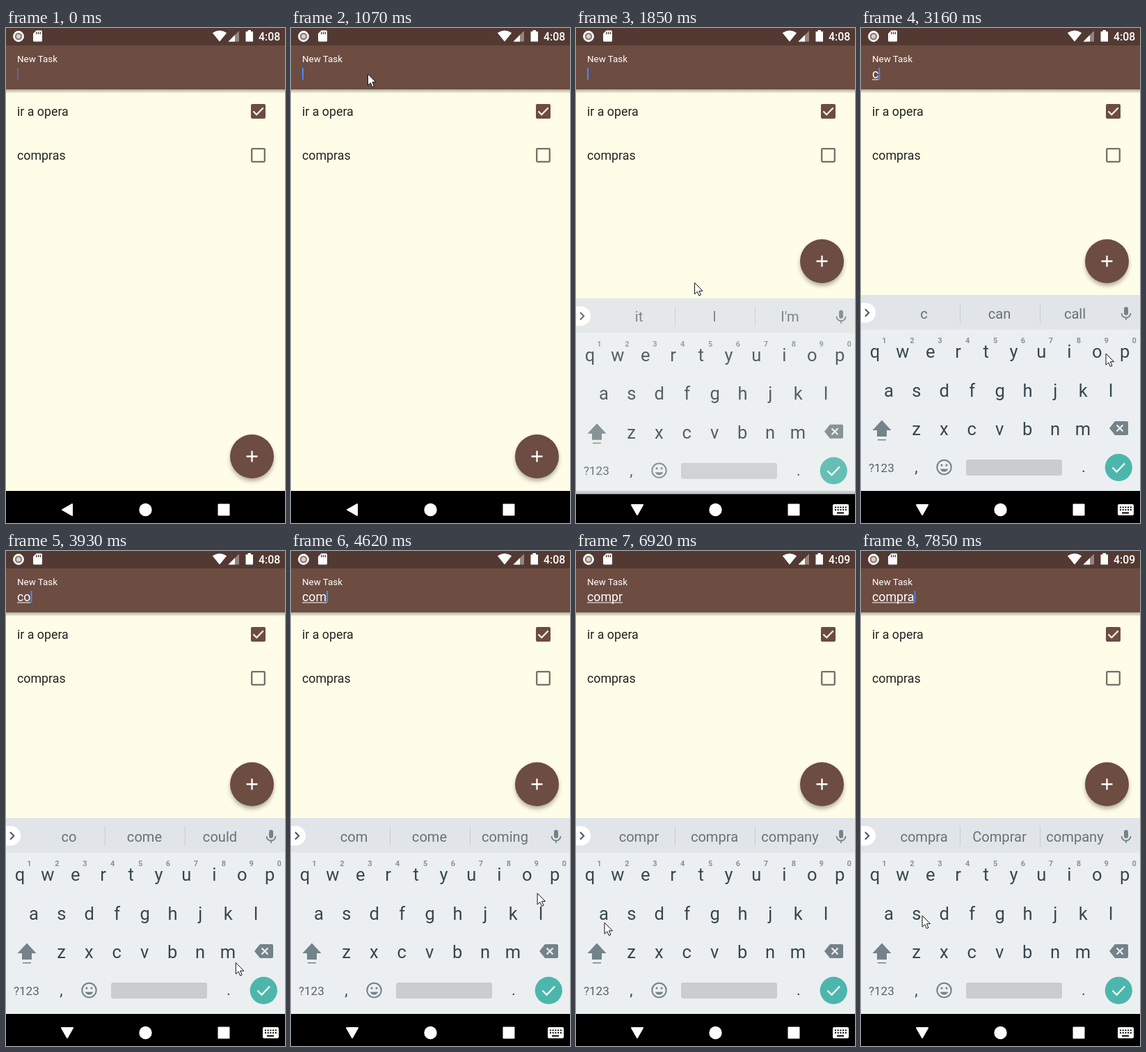
These frames come from a looping animation (401 px wide and 710 px high, 8000 ms). An HTML page:

```html
<!DOCTYPE html>
<html lang="en">
<head>
<meta charset="utf-8">
<title>New Task</title>
<style>
html, body { margin: 0; width: 100%; height: 100%; overflow: hidden; background: #000; }
svg { display: block; width: 100%; height: 100%; font-family: Roboto, sans-serif; }
</style>
</head>
<body>
<svg id="stage" viewBox="0 0 401 710" xmlns="http://www.w3.org/2000/svg"></svg>
<script>
const LOOP = 8000;
const stage = document.getElementById('stage');

const text = (x, y, size, fill, str, extra = '') =>
  `<text x="${x}" y="${y}" font-size="${size}" fill="${fill}" ${extra}>${str}</text>`;
const mid = (x, y, size, fill, str, extra = '') =>
  text(x, y, size, fill, str, 'text-anchor="middle" ' + extra);
const rect = (x, y, w, h, fill, extra = '') =>
  `<rect x="${x}" y="${y}" width="${w}" height="${h}" fill="${fill}" ${extra}/>`;
const circle = (x, y, r, fill, extra = '') =>
  `<circle cx="${x}" cy="${y}" r="${r}" fill="${fill}" ${extra}/>`;
const path = (d, fill, extra = '') => `<path d="${d}" fill="${fill}" ${extra}/>`;
const line = (d, color, w, extra = '') =>
  path(d, 'none', `stroke="${color}" stroke-width="${w}" ${extra}`);

// Keyboard layout: letters, first key centre, row centre
const rows = [['qwertyuiop', 20, 464], ['asdfghjkl', 40, 519.5], ['zxcvbnm', 79.5, 575]];
const keyPos = {};
rows.forEach(([letters, x0, y]) =>
  [...letters].forEach((ch, i) => keyPos[ch] = { x: x0 + i * 39.9, y }));

const INK = '#37474f', ICON = '#74828a';

function statusBar() {
  return rect(0, 0, 401, 25, '#523a33') +
    circle(18, 12, 6.6, '#8d7c77', 'stroke="#fff" stroke-width="2.6"') +
    circle(18, 12, 3, '#d9d2d0') +
    path('M43.5 3.5H50.5Q52 3.5 52 5V18Q52 19.5 50.5 19.5H40.500Q39 19.500 39 18V8Z', '#fff') +
    line('M43.700 5.500V9M46.500 5.500V9M49.300 5.500V9', '#523a33', 1.3) +
    path('M296.800 7Q307 0 317.200 7L307 19.500Z', '#fff') +
    path('M335 4V19.500H319.500Z', '#94847f') +
    path('M329 10V19.500H319.500Z', '#fff') +
    path('M347.500 3H352V5H355V19.500H344.500V5H347.500Z', '#fff') +
    text(363, 18, 15.8, '#fff', '4:08', 'id="clock" font-weight="500"');
}

function listRow(y, label, done) {
  const box = done
    ? rect(352, y - 10.500, 21, 21, '#6d4c41', 'rx="2"') +
      line(`M355.500 ${y}l4.700 4.700 9.500-9.700`, '#fffde7', 2.2)
    : rect(353.200, y - 9.300, 18.600, 18.600, 'none', 'rx="1" stroke="#757069" stroke-width="2.3"');
  return text(16, y + 6, 17.8, '#22221f', label) + box;
}

function keyboard() {
  let s = rect(0, 383, 401, 281, '#ebeff2') + rect(0, 664, 401, 60, '#000') +
    rect(0, 383, 401, 49.500, '#e1e5e9') +
    rect(-20, 394.500, 41, 28, '#fff', 'rx="14"') +
    line('M6 403.300l5.200 5.200-5.200 5.200', '#4d5a61', 2.1) +
    rect(142, 395, 1, 28, '#c6ccd0') + rect(257, 395, 1, 28, '#c6ccd0');
  [90.500, 199, 307.500].forEach(x => s += mid(x, 416.500, 20.1, '#667279', '', 'class="hint"'));
  s += rect(378, 400, 6, 12, ICON, 'rx="3"') +
    line('M374.500 409a6.500 6.500 0 0 0 13 0M381 415.500V419', ICON, 1.8);

  for (const ch in keyPos) s += mid(keyPos[ch].x, keyPos[ch].y + 9, 25.5, INK, ch);
  [...'1234567890'].forEach((d, i) =>
    s += mid(33.500 + i * 39.9, 452, 11, '#87939a', d, 'font-weight="700"'));

  return s +
    path('M30 562.500L43.500 577H37V586H23V577H16.500Z', ICON) + rect(24, 590, 12, 1.5, ICON) +
    path('M365 564H382Q384 564 384 566V582Q384 584 382 584H365L357 574Z', ICON) +
    line('M367.500 569.500l9 9M376.500 569.500l-9 9', '#ebeff2', 2.2) +
    text(11, 636.500, 17, '#56646b', '?123') +
    mid(79.500, 637, 22, INK, ',') + mid(320, 637, 22, INK, '.') +
    circle(119.500, 630, 10.2, 'none', `stroke="${ICON}" stroke-width="2"`) +
    circle(116, 627, 1.6, ICON) + circle(123, 627, 1.6, ICON) +
    path('M113.700 632.500H125.300Q123.500 636.500 119.500 636.500T113.700 632.500Z', ICON) +
    rect(151, 619, 138, 23, '#c9cdd0', 'rx="3"') +
    circle(370.300, 630.300, 19.6, '#4db6ac') +
    line('M361.500 630.500l6 6 11.500-12', '#fff', 2.3);
}

function navIcons() {
  const round = 'stroke="#fff" stroke-width="2" stroke-linejoin="round"';
  let keys = '';
  for (let r = 0; r < 2; r++)
    for (let c = 0; c < 5; c++) keys += rect(372 + c * 3.700, 686.500 + r * 3.600, 2, 2, '#000');
  return path('M81 691L95 683V699Z', '#fff', round + ' id="back"') +
    circle(200.500, 691, 9.2, '#fff') + rect(304.500, 682.500, 17, 17, '#fff', 'rx="1"') +
    `<g id="imeIcon">${rect(369, 683, 23, 16, '#fff', 'rx="2"')}${keys}${rect(375, 694.500, 10, 2, '#000')}</g>`;
}

stage.innerHTML = `<defs>
  <filter id="soft" x="-50%" y="-50%" width="200%" height="200%"><feGaussianBlur stdDeviation="3"/></filter>
  <linearGradient id="drop" x2="0" y2="1"><stop stop-opacity=".32"/><stop offset="1" stop-opacity="0"/></linearGradient>
</defs>` +
  rect(0, 0, 401, 664, '#fffde7') +
  listRow(119.5, 'ir a opera', true) + listRow(182.5, 'compras', false) +
  rect(0, 88, 401, 6, 'url(#drop)') + rect(0, 25, 401, 63, '#6d4c41') + statusBar() +
  text(16, 49, 13.4, '#fff', 'New Task') +
  text(16, 71.5, 17.8, '#fff', '', 'id="input"') +
  rect(16, 73.5, 0, 1, '#fff', 'id="under"') +
  rect(16, 57, 2, 17, '#448aff', 'id="caret"') +
  `<g id="fab">${circle(353.5, 618.5, 31, '#000', 'opacity=".33" filter="url(#soft)"')}` +
  circle(353.5, 614.5, 31.5, '#6d4c41') +
  line('M345.500 614.500h16M353.500 606.500v16', '#fff', 2.3) + '</g>' +
  rect(0, 664, 401, 46, '#000') +
  `<g id="ime">${keyboard()}</g>` + navIcons() +
  `<g id="popup">${rect(1, 3, 48, 98, '#000', 'rx="4" opacity=".2" filter="url(#soft)"')}` +
  rect(0, 0, 50, 100, '#f7f9fa', 'rx="4"') + mid(25, 36, 29, INK, '', 'id="popChar"') + '</g>' +
  circle(110, 65, 12, '#fff', 'id="tap" opacity=".3"') +
  `<g id="mouse">${path('M0 0V16.200L3.800 12.700 6.300 18.500 8.900 17.400 6.400 11.700H11.500Z', '#fff',
    'stroke="#111" stroke-width="1" stroke-linejoin="round"')}</g>`;

const $ = id => document.getElementById(id);
const hints = [...stage.querySelectorAll('.hint')];

// Key presses: time, letter, suggestions that follow
const presses = [
  [2660, 'c', 'c can call'],
  [3500, 'o', 'co come could'],
  [4350, 'm', 'com come coming'],
  [5350, 'p', 'comp company computer'],
  [6200, 'r', 'compr compra company'],
  [7340, 'a', 'compra Comprar company']
];
const caretResets = [500, 900, 1700, ...presses.map(p => p[0])];
const IME_START = 1780, CLOCK_TICK = 4900;

// Pointer stops: time, x, y
const stops = [
  [150, 341, 658], [840, 110.5, 66], [1390, 110.5, 66], [1850, 170.5, 365],
  [2160, 184, 475], [2390, 160, 579], [2690, 160, 579], [3160, 352, 467],
  [3390, 356, 470], [3530, 356, 470], [4000, 327, 598], [4230, 322, 581],
  [4390, 322, 581], [4620, 354, 491], [5000, 376, 466], [5390, 376, 466],
  [5930, 148, 485], [6240, 148, 485], [6920, 41, 533], [7420, 41, 533], [7850, 88, 523]
];

function slope(i, k) {
  const a = stops[i - 1], b = stops[i], c = stops[i + 1];
  if (!a || !c) return 0;
  const m = (b[k] - a[k]) / (b[0] - a[0]), n = (c[k] - b[k]) / (c[0] - b[0]);
  return m * n <= 0 ? 0 : 2 * m * n / (m + n);
}

function pointer(t, k) {
  const last = stops.length - 1;
  if (t >= stops[last][0]) return stops[last][k];
  const i = Math.max(0, stops.findIndex(s => s[0] > t) - 1);
  const a = stops[i], b = stops[i + 1], d = b[0] - a[0];
  const u = Math.max(0, (t - a[0]) / d), v = 1 - u;
  return v * v * (1 + 2 * u) * a[k] + u * u * (3 - 2 * u) * b[k] +
    d * u * v * (v * slope(i, k) - u * slope(i + 1, k));
}

function caretAlpha(t) {
  if (t < 150) return .5;
  const from = caretResets.filter(r => r <= t).pop();
  if (from === undefined) return 0;
  const p = (t - from) % 1000;
  if (p < 500) return 1;
  return Math.max(0, 1 - (p - 500) / 80, (p - 920) / 80);
}

const show = (el, on) => el.setAttribute('visibility', on ? 'visible' : 'hidden');
const put = (el, str) => { if (el.textContent !== str) el.textContent = str; };

function draw(t) {
  const done = presses.filter(p => p[0] <= t), last = done[done.length - 1];
  put($('input'), done.map(p => p[1]).join(''));
  const w = done.length ? $('input').getComputedTextLength() : 0;
  $('under').setAttribute('width', w);
  $('caret').setAttribute('x', 16 + w);
  $('caret').setAttribute('opacity', caretAlpha(t));
  (last ? last[2].split(' ') : ['it', 'I', "I'm"]).forEach((s, i) => put(hints[i], s));
  put($('clock'), t < CLOCK_TICK ? '4:08' : '4:09');

  const open = t >= IME_START;
  const k = Math.pow(1 - Math.min(1, Math.max(0, (t - IME_START) / 220)), 5);
  show($('ime'), open);
  show($('imeIcon'), open);
  $('ime').setAttribute('opacity', 1 - k);
  $('ime').setAttribute('transform', `translate(0 ${33 * k})`);
  $('fab').setAttribute('transform', `translate(0 ${open ? -280 : 0})`);
  $('back').setAttribute('d', open ? 'M80 684H96L88 698Z' : 'M81 691L95 683V699Z');

  const pressed = last && t - last[0] < 110;
  show($('popup'), pressed);
  if (pressed) {
    const { x, y } = keyPos[last[1]];
    put($('popChar'), last[1]);
    $('popup').setAttribute('transform', `translate(${Math.min(351, x - 25)} ${y - 75})`);
  }

  show($('tap'), t >= 990 && t < 1070);
  show($('mouse'), t >= 150);
  $('mouse').setAttribute('transform', `translate(${pointer(t, 1)} ${pointer(t, 2)})`);
}

const start = performance.now();
function tick() {
  draw((performance.now() - start) % LOOP);
  requestAnimationFrame(tick);
}
tick();
</script>
</body>
</html>
```
